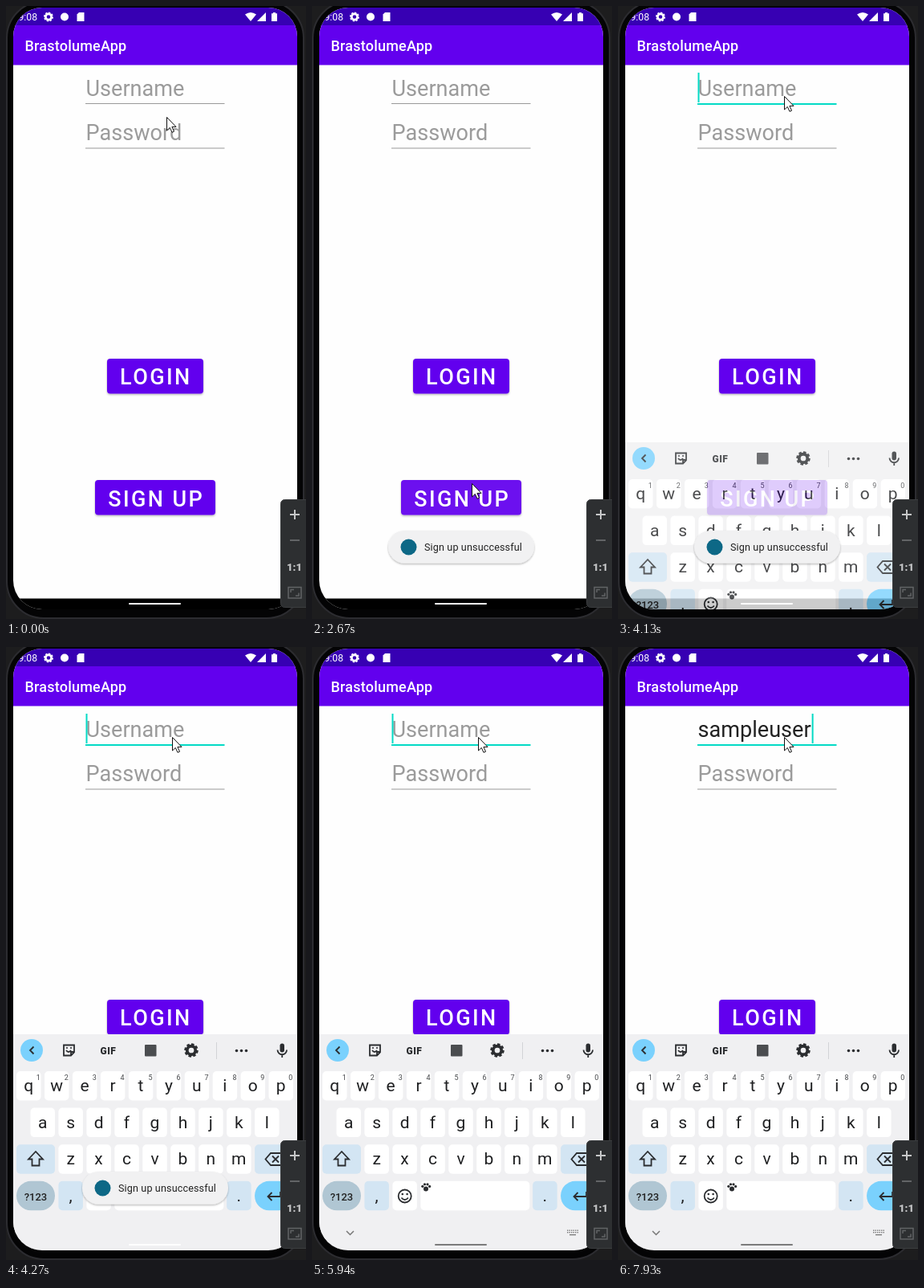
An HTML page for the animation above (8000 ms loop, 374 px wide and 763 px high).

```html
<!DOCTYPE html>
<html lang="en">
<head>
<meta charset="utf-8">
<title>Sign-up demo</title>
<style>
html, body { margin: 0; width: 100%; height: 100%; overflow: hidden; background: #1d1d1e; }
svg { display: block; font-family: Roboto, sans-serif; }
text { white-space: pre; }
.field { font-size: 27.1px; }
.hint { fill: #9b9b9b; }
.btn { font-size: 27px; font-weight: 500; letter-spacing: 2.4px; fill: #fff; }
.key { font-size: 21px; fill: #1f2022; text-anchor: middle; }
.digit { font-size: 9px; fill: #46484b; text-anchor: middle; }
.gif { font-size: 12px; font-weight: 900; letter-spacing: .5px; fill: #2b2d30; }
.mode { font-size: 13px; font-weight: 500; fill: #222; text-anchor: middle; }
.line { fill: none; stroke: #2b2d30; stroke-width: 1.8; }
#extras .line { stroke: #777; stroke-width: 1.5; }
</style>
</head>
<body>
<svg width="374" height="763" viewBox="0 0 374 763">
  <defs>
    <clipPath id="screen"><rect x="9" y="2" width="354" height="749" rx="36"/></clipPath>
    <filter id="shadow" x="-10%" y="-20%" width="120%" height="150%">
      <feDropShadow dx="0" dy="1.3" stdDeviation="1" flood-opacity=".3"/>
    </filter>
  </defs>

  <rect x="1" y="-6" width="370" height="768" rx="46" fill="#040405" stroke="#2c2c30" stroke-width="2"/>

  <g clip-path="url(#screen)">
    <rect width="374" height="763" fill="#fefefe"/>
    <rect width="374" height="24" fill="#3700b3"/>
    <rect y="24" width="374" height="49.500" fill="#6200ee"/>
    <g id="status" fill="#fff">
      <text x="15.500" y="18" font-size="12.200">9:08</text>
      <circle cx="73" cy="13.500" r="5"/>
      <path d="M91 8h6.500v11h-9v-8.500z"/>
      <path d="M298 10.500Q305 5.500 312 10.500L305 19z"/>
      <path d="M324 8v11h-11z"/>
      <path d="M331 9.300h2v-1.300h3v1.300h2v9.700h-7z"/>
    </g>
    <text x="23.500" y="56" font-size="18" font-weight="500" letter-spacing=".2" fill="#fff">BrastolumeApp</text>

    <text id="hint" class="field hint" x="99.500" y="112">Username</text>
    <text id="typed" class="field" x="99.500" y="112" fill="#222"></text>
    <rect id="rule" x="99" y="121" width="173.500"/>
    <text class="field hint" x="99.500" y="167">Password</text>
    <rect x="99" y="176.500" width="173.500" height="1" fill="#999"/>
    <rect id="caret" y="83" width="2" height="37" fill="#03dac5"/>

    <rect x="126" y="439" width="120" height="43.500" rx="4" fill="#6200ee" filter="url(#shadow)"/>
    <text class="btn" x="142" y="471">LOGIN</text>
    <rect x="111" y="590" width="150" height="43.500" rx="4" fill="#6200ee" filter="url(#shadow)"/>
    <rect id="ripple" x="111" y="590" width="150" height="43.500" rx="4" fill="#fff"/>
    <text class="btn" x="127.300" y="623">SIGN UP</text>

    <rect y="737.500" width="374" height="20" fill="#000"/>
    <g id="keyboard"></g>
    <rect id="handle" x="153" y="743" width="65" height="2" rx="1"/>
    <g id="toast">
      <rect x="95" y="653" width="182" height="40.500" rx="20.200" fill="#f1f1f2" filter="url(#shadow)"/>
      <circle cx="120.500" cy="673.500" r="10" fill="#0d6886"/>
      <text x="140" y="678" font-size="12.600" letter-spacing=".13" fill="#222">Sign up unsuccessful</text>
    </g>
  </g>

  <g fill="none" stroke-width="2">
    <rect x="342.500" y="614.500" width="40" height="134" rx="5" fill="#2d2f31" stroke="#3b3d3f" stroke-width="1"/>
    <path d="M354 633h12M360 627v12" stroke="#c6c7c8"/>
    <path d="M354 665h12" stroke="#626466"/>
    <text x="359.500" y="703" font-size="13" font-weight="900" text-anchor="middle" fill="#c6c7c8">1:1</text>
    <path d="M352 723.500h16v13.500h-16zM355 730v-3.500h4M365 730.500v3.500h-4" stroke="#626466" stroke-width="1.500"/>
  </g>

  <path id="cursor" d="M.5.5V17L4.300 13.400 7 19.300 9.500 18.200 6.900 12.400H12z" fill="#fff" stroke="#111"/>
</svg>

<script>
const $ = id => document.getElementById(id);
const set = (id, attrs) => Object.entries(attrs).forEach(([k, v]) => $(id).setAttribute(k, v));
const repeat = (n, make) => Array.from({ length: n }, (_, i) => make(i)).join('');

// --- drawing helpers ---
const text = (cls, x, y, s) => `<text class="${cls}" x="${x}" y="${y}">${s}</text>`;
const box = (x, y, w, h, fill, r = 0) =>
  `<rect x="${x}" y="${y}" width="${w}" height="${h}" rx="${r}" fill="${fill}"/>`;
const dot = (x, y, r, fill = '#2b2d30') => `<circle cx="${x}" cy="${y}" r="${r}" fill="${fill}"/>`;
const line = d => `<path class="line" d="${d}"/>`;
const gear = (x, y, r, color) => `<g fill="none" stroke="${color}">
  <circle cx="${x}" cy="${y}" r="${r * .62}" stroke-width="${r * .45}"/>
  <circle cx="${x}" cy="${y}" r="${r * .88}" stroke-width="${r * .3}" pathLength="16" stroke-dasharray="1.2 .8"/></g>`;

// Keys sit on a grid: column c (may be fractional) and row r
const PITCH = 34.95, PALE = '#d3e5f3', SKY = '#7ad1fd';
const keyX = c => 13 + c * PITCH;
const keyY = r => 528 + r * 45.6;
const key = (c, r, label = '', fill = '#fff', w = 30.5, round = 5) =>
  box(keyX(c), keyY(r), w, 36.5, fill, round) + text('key', keyX(c) + 15.2, keyY(r) + 25, label);
const row = (letters, c, r) => repeat(letters.length, i => key(c + i, r, letters[i]));

function toolbar() {
  return dot(32, 502, 14, SKY) + line('M34.5 497.5L30 502l4.500 4.500') +
    line('M72 495.500h13v9l-4 4h-9zM85 504h-4v4M75 502q3 4 6 0') + dot(76, 499, 1) + dot(81, 499, 1) +
    text('gif', 117.5, 506.5, 'GIF') + box(173, 495, 14.5, 14.5, '#4b4d50', 1) +
    gear(231, 502, 8.5, '#2b2d30') + box(262, 492, 1, 21, '#d2d3d6') +
    repeat(3, i => dot(287.5 + 6 * i, 502.5, 1.8)) +
    box(341.5, 493.5, 5.5, 11, '#2b2d30', 2.7) + line('M338.500 501.500a5.700 5.700 0 0 0 11.500 0M344.250 507v4');
}

function specialKeys() {
  const paw = dot(142, 674.5, 3) +
    repeat(4, i => dot(142.2 - 5 * Math.cos(.5 + i * .72), 674 - 5.6 * Math.sin(.5 + i * .72), 1.6));
  return key(0, 2, '', PALE, 48) + line('M37 628l-9 9.500h4.500v8h9v-8h4.500z') +
    key(8.5, 2, '', PALE, 47.5) + line('M330 630h15v15h-15l-6.500-7.500zM332 633.500l8 8M340 633.500l-8 8') +
    key(0, 3, '', '#b0c6d3', 48, 18) + text('mode', 37, 689, '?123') +
    key(1.5, 3, ',', PALE) + key(2.5, 3) +
    '<circle class="line" cx="115.700" cy="683.500" r="8"/>' +
    dot(112.8, 681, 1.3) + dot(118.6, 681, 1.3) + line('M111.500 685.500q4.200 5 8.400 0') +
    key(3.5, 3, '', '#fff', 136) + paw + key(7.5, 3, '.', PALE) +
    key(8.5, 3, '', SKY, 47.5, 18) + line('M342 678v6h-15M331.500 679l-5 5 5 5');
}

const extras = () => `<g id="extras">${line('M43 727l4.500 4.500 4.500-4.500')}${
  repeat(12, i => box(318 + i % 6 * 2.5, 725.5 + (i / 6 | 0) * 2.5, 1.4, 1.4, '#777'))}${
  box(321, 731, 8, 1.3, '#777')}</g>`;

$('status').insertAdjacentHTML('beforeend', gear(53, 13.5, 5.8, '#fff'));
$('keyboard').innerHTML = box(9, 482, 354, 290, '#f0f0f2') + toolbar() +
  row('qwertyuiop', 0, 0) + repeat(10, i => text('digit', keyX(i) + 27.3, 538.5, (i + 1) % 10)) +
  row('asdfghjkl', .5, 1) + row('zxcvbnm', 1.5, 2) + specialKeys() + extras();

// --- motion ---
const LOOP = 8000, STEP = 124, PHASE = 38;
const snap = t => Math.max(0, Math.floor((t - PHASE) / STEP) * STEP + PHASE);
const ramp = (t, a, b) => Math.min(1, Math.max(0, (t - a) / (b - a)));

// Pointer stops: time, x, y
const path = [
  [150, 200, 138], [286, 181, 106], [610, 181, 106], [1100, 257, 400], [1650, 207, 612],
  [2642, 199, 594], [2766, 210, 315], [3470, 208, 85], [3750, 207, 112]
];

// Each leg adds its share of the way to the next stop
const pointer = (t, axis) => path.reduce((v, p, i) =>
  i ? v + (p[axis] - path[i - 1][axis]) * ramp(t, path[i - 1][0], p[0]) : p[axis], 0);

const name = 'sampleuser', FOCUS = 3880, SHOW = 4006, TYPE = 7200;

function draw(time) {
  const t = snap(time);
  set('cursor', { transform: `translate(${pointer(t, 1)} ${pointer(t, 2)})` });
  set('ripple', { opacity: .25 * (ramp(t, 2200, 2300) - ramp(t, 2300, 2760)) });
  set('toast', { opacity: ramp(t, 2290, 2540) - ramp(t, 4390, 4600) });

  const focus = t >= FOCUS;
  set('rule', { height: focus ? 2 : 1, fill: focus ? '#03dac5' : '#999' });

  const typed = t < TYPE ? 0 : Math.round(1 + 9 * ramp(t, TYPE, 7850));
  $('typed').textContent = name.slice(0, typed);
  set('hint', { opacity: typed ? 0 : 1 });
  const lit = typed || Math.floor((t - 3930) / 470) % 2 === 0;
  set('caret', {
    x: 99.5 + (typed && $('typed').getComputedTextLength() + 1),
    opacity: t >= SHOW && lit ? 1 : 0
  });

  const rise = ramp(t, SHOW, SHOW + 2 * STEP);
  set('keyboard', {
    opacity: Math.min(1, rise * 1.6),
    transform: `translate(0 ${122 * (1 - rise)})`
  });
  set('extras', { opacity: ramp(t, 4650, 5250) });
  const grey = 255 - 132 * ramp(t, 4254, 5000);
  set('handle', { fill: `rgb(${grey},${grey},${grey})` });
}

const start = performance.now();
function loop() {
  draw((performance.now() - start) % LOOP);
  requestAnimationFrame(loop);
}
loop();
</script>
</body>
</html>
```
